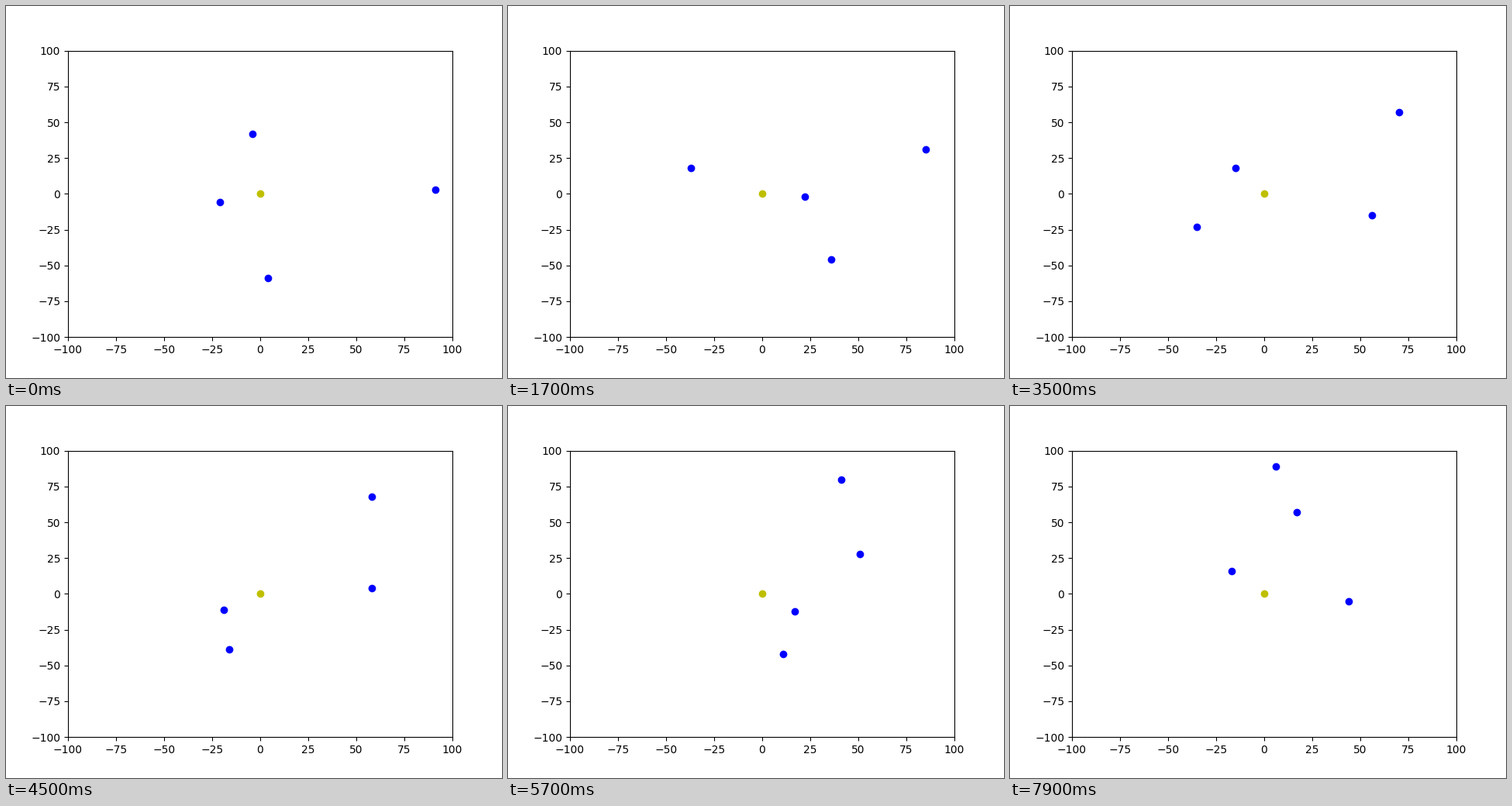
Write a matplotlib script that moves like this. It is 640 px wide and 480 px high and loops after 8000 ms.

```python
import numpy as np
import matplotlib.pyplot as plt
from matplotlib.animation import FuncAnimation

FRAMES = 80
INTERVAL = 100
GRAVITY = 838000  # rate^2 * radius^3, the same for every planet

plt.rcParams["text.kerning_factor"] = 6


def orbit(rate, start, ecc, perihelion):
    """Kepler orbit (angles in degrees) as a function of the time step.

    The size follows from the rate by the third law; the position is a
    series in the eccentricity, cut to whole units.
    """
    size = (GRAVITY / rate**2) ** (1 / 3)
    peri = np.radians(perihelion)

    def position(step):
        m = np.radians(start + rate * step) - peri
        angle = peri + m + 2 * ecc * np.sin(m) + 1.25 * ecc**2 * np.sin(2 * m)
        r = size * (1 - ecc * np.cos(m) + (ecc * np.sin(m)) ** 2)
        return int(r * np.cos(angle)), int(r * np.sin(angle))

    return position


planets = [
    orbit(rate=8.312, start=204.78, ecc=0.076, perihelion=278.5),
    orbit(rate=3.224, start=98.95, ecc=0.027, perihelion=163),
    orbit(rate=1.968, start=-84, ecc=0.015, perihelion=0),
    orbit(rate=1.061, start=3.21, ecc=0.012, perihelion=140),
]

fig, ax = plt.subplots(figsize=(6.4, 4.8), dpi=100)
ax.set_xlim(-100, 100)
ax.set_ylim(-100, 100)
ax.plot(0, 0, "yo")
dots, = ax.plot([], [], "bo")


def update(step):
    dots.set_data(*zip(*(planet(step) for planet in planets)))
    return dots,


anim = FuncAnimation(fig, update, frames=FRAMES, interval=INTERVAL,
                     repeat=True, repeat_delay=0)
plt.show()
```
